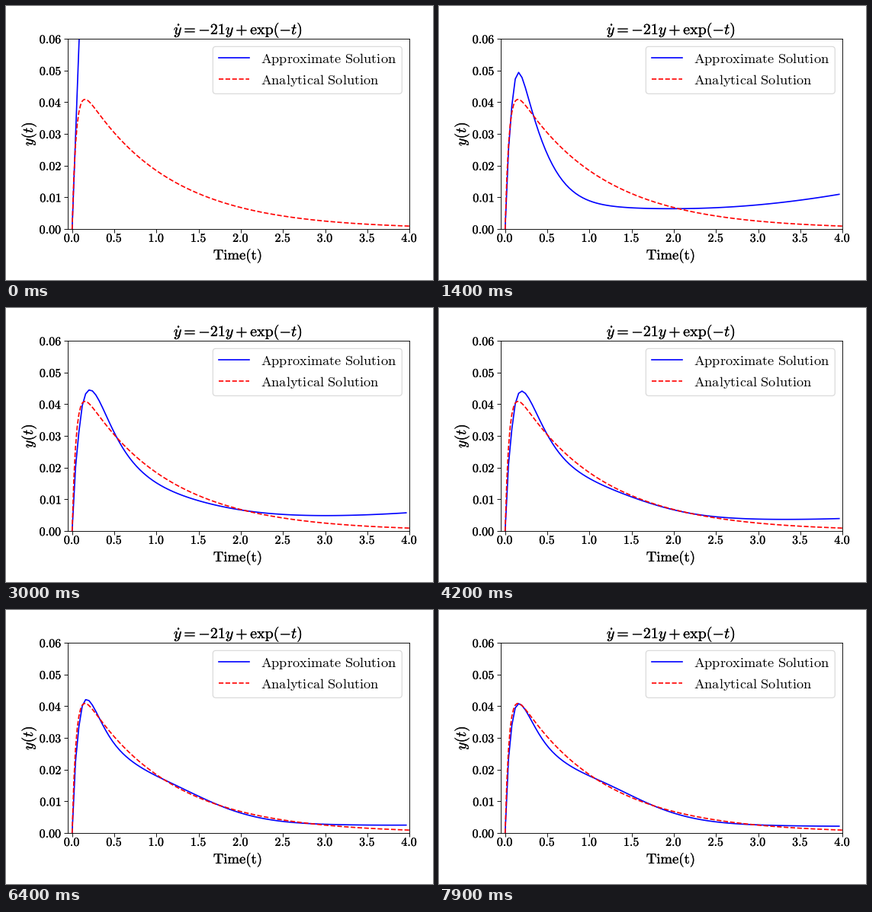
Recreate the animation shown at these times as a matplotlib script. Size 560x360 px, loop 8 s.

```python
import numpy as np
import matplotlib.pyplot as plt
from matplotlib.animation import FuncAnimation
from matplotlib.patches import FancyBboxPatch
from matplotlib.patheffects import withStroke

W, H, DPI = 560, 360, 80
FRAMES, STEP = 80, 100
SETTLED = 14  # the first steep line has vanished by here

plt.rcParams["mathtext.fontset"] = "cm"


def exact(t):
    return (np.exp(-t) - np.exp(-21 * t)) / 20


def bump(t, centre, width):
    """Bell curve on a logarithmic time axis."""
    return np.exp(-(np.log(np.maximum(t, 1e-9) / centre) / width)**2)


def ramp(n, start, end, low=0, high=1):
    return np.interp(n, [start, end], [low, high])


def error(t, n):
    """Error of the approximation, in thousandths, as training goes on."""
    n = max(n, SETTLED)
    age = n - SETTLED
    swing = ramp(n, 14, 45) * np.cos(2 * np.pi * (n - 72) / 4.8)

    lag = np.interp(n, [14, 30, 79], [2.2, 8, 2.9]) - swing
    hump = 8.9 * np.exp(-age / 42) + 1.6 * swing
    dip = 2.2 + 8.8 * np.exp(-age / 11) - .8 * swing
    tail = 1.05 + 9.35 * np.exp(-age / 18.5)

    return (tail * (t / 4)**2
            - lag * bump(t, .055, .7)
            + hump * bump(t, .15 + .0022 * lag**2, .75)
            - dip * bump(t, ramp(n, 35, 60, .8, .54), ramp(n, 30, 42, .8, .6))
            + ramp(n, 42, 72) * bump(t, 1.3, .35)
            - 1.2 * ramp(n, 24, 50) * bump(t, 2.3, .35))


def approx(t, n):
    line = .5**n if n < SETTLED else 0
    return (1 - line) * (exact(t) + error(t, n) / 1000) + line * .72 * t


fig = plt.figure(figsize=(W / DPI, H / DPI), dpi=DPI, facecolor="white")
ax = fig.add_axes([81.2 / W, 67 / H, 448 / W, 250 / H])
ax.set(xlim=(-.05, 4), ylim=(0, .06),
       xticks=np.arange(0, 4.1, .5), yticks=np.arange(0, .061, .01))
ax.xaxis.set_major_formatter("${x:.1f}$")
ax.yaxis.set_major_formatter("${x:.2f}$")
ax.tick_params(labelsize=14.4, length=4.4)
ax.tick_params(axis="x", pad=0)
ax.tick_params(axis="y", pad=2.6)
heavy = [withStroke(linewidth=.2, foreground="black")]
for label in ax.get_xticklabels() + ax.get_yticklabels():
    label.set_path_effects(heavy)

t = np.arange(100) * .04
curve, = ax.plot([], [], "b-", lw=1.5)
fine = np.linspace(0, 4, 201)
ax.plot(fine, exact(fine), "r--", lw=1.5)

# Overlay in pixel units for titles and legend
page = fig.add_axes([0, 0, 1, 1], zorder=5)
page.set(xlim=(0, W), ylim=(H, 0))
page.axis("off")


def text(x, y, s, size, **kw):
    return page.text(x, y, s, fontsize=size, **{"va": "baseline", **kw})


text(304.5, 37, r"$\dot{y} = {-}21y + \exp(-t)$", 18, ha="center", path_effects=heavy)
text(304, 333, r"$\mathrm{Time(t)}$", 16.8, ha="center", path_effects=heavy)
text(30, 168, r"$y(t)$", 17.5, ha="center", va="center", rotation=90,
     path_effects=heavy)

page.add_patch(FancyBboxPatch((271.3, 53.3), 248, 62,
                              boxstyle="round,pad=0,rounding_size=4",
                              fc="white", ec="0.8", lw=1, alpha=.8))
for y, style, name in ((68, "b-", "Approximate"), (96, "r--", "Analytical")):
    page.plot([279.3, 319.3], [y, y], style, lw=1.5)
    text(334.5, y + 7, rf"$\mathrm{{{name}\ Solution}}$", 16.5)


def update(n):
    curve.set_data(t, approx(t, n))
    return curve,


anim = FuncAnimation(fig, update, frames=FRAMES, interval=STEP,
                     repeat=True, repeat_delay=0, blit=False)
plt.show()
```
